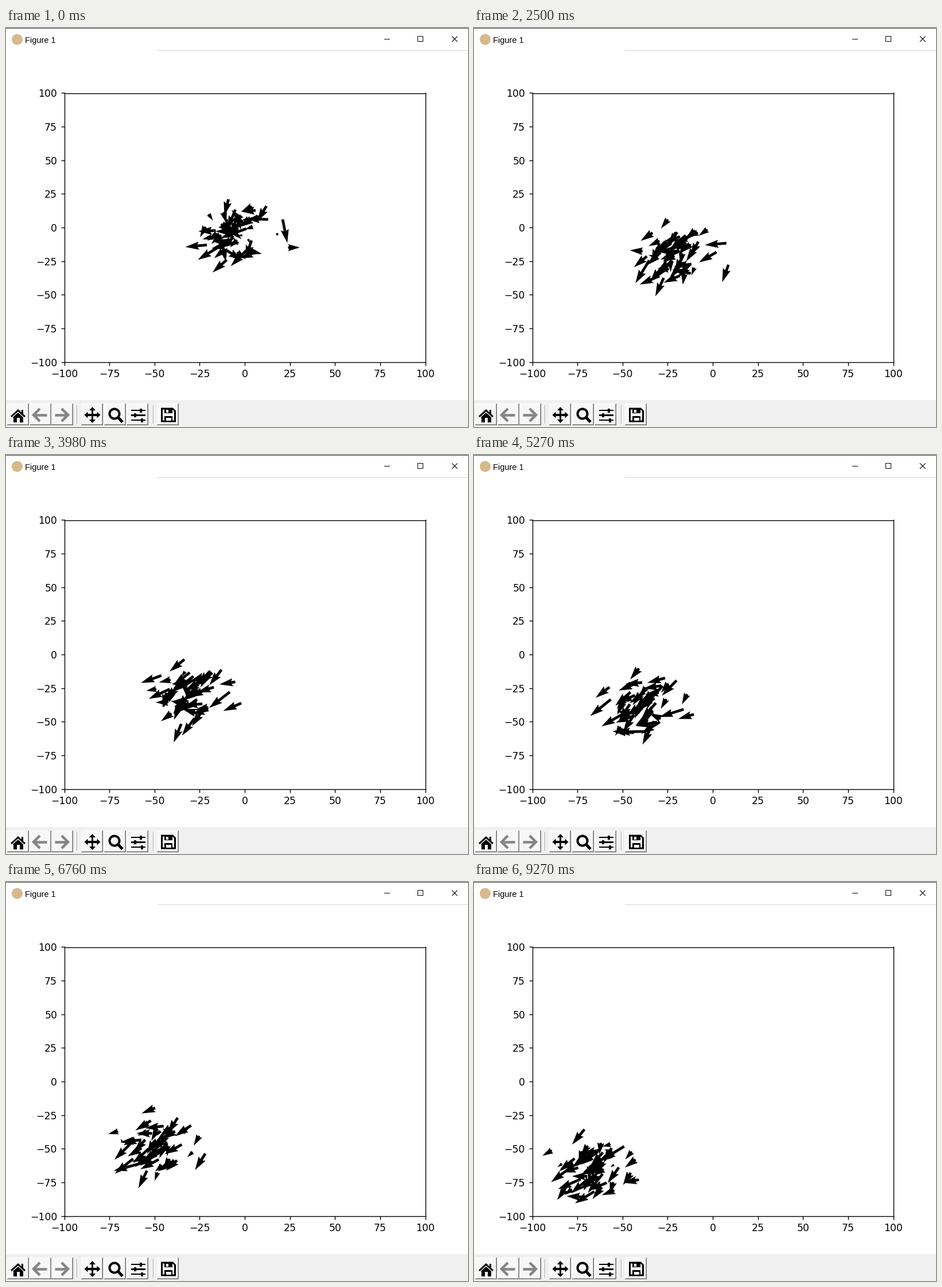
Write a matplotlib script that moves like this. It is 805 px wide and 696 px high and loops after 9350 ms.

```python
import numpy as np
import matplotlib.pyplot as plt
from matplotlib.animation import FuncAnimation
from matplotlib.patches import Circle, Polygon, Rectangle

W, H, DPI = 805, 696, 100
PX = 72 / DPI                  # points per pixel
LOOP, TICK = 9350, 50
FIRST, PACE = 100, 152.8       # first step and time per step, ms
BIRDS, STATES = 50, 62
WIND = -7                      # mean velocity along both axes
DT = 1 / 7
# Stragglers around the core of the flock
EDGE = [(24, -15), (21, 6), (18, -5), (13, 6), (12, 16),
        (5, -19), (-9, 21), (-10, -17), (-21, -13), (-20, 10)]


def simulate():
    """Random start, then every bird is blown along by a gusty wind."""
    rng = np.random.default_rng(12)
    vel = WIND + rng.normal(0, (3.2, 4), (STATES, BIRDS, 2))
    vel[0] = rng.normal(-4.5, (6, 7), (BIRDS, 2))
    start = rng.normal((-4, -2), 8, (BIRDS, 2))
    start[:len(EDGE)] = EDGE
    moved = np.cumsum(vel * DT, axis=0) - vel * DT
    return start + moved, vel


fig = plt.figure(figsize=(W / DPI, H / DPI), dpi=DPI, facecolor="white")
win = fig.add_axes([0, 0, 1, 1])
win.set(xlim=(0, W), ylim=(H, 0))
win.axis("off")


def line(points, width=1, color="black"):
    x, y = zip(*points)
    win.plot(x, y, color=color, lw=width * PX, solid_capstyle="butt",
             solid_joinstyle="miter", zorder=3)


def rect(x, y, w, h, color="black"):
    win.add_patch(Rectangle((x, y), w, h, fc=color, ec="none", zorder=2))


def poly(points, color="black"):
    win.add_patch(Polygon(points, fc=color, ec="none", zorder=3))


def button(x, y=655, size=38):
    rect(x, y, size, size, "#6e6e6e")
    rect(x, y, size - 1, size - 1, "white")
    rect(x + 1, y + 1, size - 2, size - 2, "#a6a6a6")
    rect(x + 1, y + 1, size - 3, size - 3, "#f7f7f7")


def title_bar():
    rect(0, 0, W, 1, "#4a4a4a")
    rect(263, 39, W - 263, 1, "#d6d6d6")
    win.add_patch(Circle((19.5, 20), 9.5, fc="#d8b98c", ec="none"))
    win.text(32.5, 26, "Figure 1", fontsize=14.5 * PX,
             family="Liberation Sans")
    rect(659, 19, 10, 1)
    rect(717, 14, 10, 10)
    rect(718, 15, 8, 8, "white")
    line([(777, 14.5), (786.5, 24)], 1.1)
    line([(777, 24), (786.5, 14.5)], 1.1)


def home(x, y):
    line([(x - 12, y + 2), (x, y - 9), (x + 12, y + 2)], 3)
    rect(x + 6, y - 10, 3, 7)
    rect(x - 8.5, y + 3, 6, 9)
    rect(x + 2.5, y + 3, 6, 9)
    poly([(x - 8.5, y + 4), (x - 8.5, y + 2.5), (x, y - 5),
          (x + 8.5, y + 2.5), (x + 8.5, y + 4)])


def arrow(x, y, way):
    line([(x + 11 * way, y - 11), (x, y), (x + 11 * way, y + 11)], 4.5,
         "#858585")
    line([(x + 2 * way, y), (x + 23 * way, y)], 4.5, "#858585")


def pan(x, y):
    rect(x - 9, y - 1.8, 18, 3.6)
    rect(x - 1.8, y - 9, 3.6, 18)
    for dx, dy in ((1, 0), (-1, 0), (0, 1), (0, -1)):
        bx, by = x + 8 * dx, y + 8 * dy
        poly([(x + 14 * dx, y + 14 * dy),
              (bx + 5.5 * dy, by + 5.5 * dx),
              (bx - 5.5 * dy, by - 5.5 * dx)])


def zoom(x, y):
    win.add_patch(Circle((x, y), 8.5, fc="none", ec="black", lw=4 * PX,
                         zorder=3))
    line([(x + 6, y + 6), (x + 14, y + 14.5)], 5)


def sliders(x, y):
    for dy, knob in ((-8.5, 4), (0, -6), (8.5, 6)):
        rect(x - 12.5, y + dy - 1.4, 25, 2.8)
        rect(x + knob - 2, y + dy - 3.5, 4, 7)


def save(x, y):
    poly([(x - 13, y - 12.5), (x + 8, y - 12.5), (x + 13, y - 7.5),
          (x + 13, y + 12.5), (x - 13, y + 12.5)])
    poly([(x - 10, y - 9.5), (x + 7, y - 9.5), (x + 10, y - 6.5),
          (x + 10, y + 9.5), (x - 10, y + 9.5)], "#f7f7f7")
    for dy, h, slot in ((-12, 9, 4), (2, 10, 9)):
        poly([(x - 7, y + dy), (x + 7, y + dy),
              (x + 7, y + dy + h), (x - 7, y + dy + h)])
        poly([(x - 4.5, y + dy + 2.5), (x - 4.5 + slot, y + dy + 2.5),
              (x - 4.5 + slot, y + dy + 7.5), (x - 4.5, y + dy + 7.5)],
             "#f7f7f7")


def toolbar():
    rect(0, 649, W, 47, "#f0f0f0")
    for x in (2, 41, 79, 131, 171, 210, 263):
        button(x)
    for x in (123, 256):
        rect(x, 658, 1, 32, "#a6a6a6")
        rect(x + 1, 658, 1, 32, "white")
    home(21, 676)
    arrow(48, 675, 1)
    arrow(108, 675, -1)
    pan(150.5, 675)
    zoom(189, 673)
    sliders(230.5, 675.5)
    save(283, 675)


def plot_axes():
    left, right, top, bottom = 101.5, 730.5, 113.5, 582.5
    ax = fig.add_axes([left / W, 1 - bottom / H,
                       (right - left) / W, (bottom - top) / H])
    ticks = np.arange(-100, 101, 25)
    ax.set(xlim=(-100, 100), ylim=(-100, 100), xticks=ticks, yticks=ticks)
    ax.tick_params(length=6 * PX, width=1.39 * PX, pad=6.5 * PX,
                   labelsize=17.2 * PX, labelfontfamily="DejaVu Sans")
    for spine in ax.spines.values():
        spine.set_linewidth(1.39 * PX)
    return ax


title_bar()
toolbar()
ax = plot_axes()

pos, vel = simulate()
flock = ax.quiver(*pos[0].T, *vel[0].T, angles="xy", scale_units="xy",
                  scale=1, units="dots", width=4.7, color="black")


def update(i):
    now = (i + 0.8) * TICK
    k = int((now - FIRST) // PACE) + 1
    flock.set_offsets(pos[k])
    flock.set_UVC(*vel[k].T)
    return flock,


anim = FuncAnimation(fig, update, frames=LOOP // TICK, interval=TICK,
                     repeat=True, repeat_delay=0)
plt.show()
```
